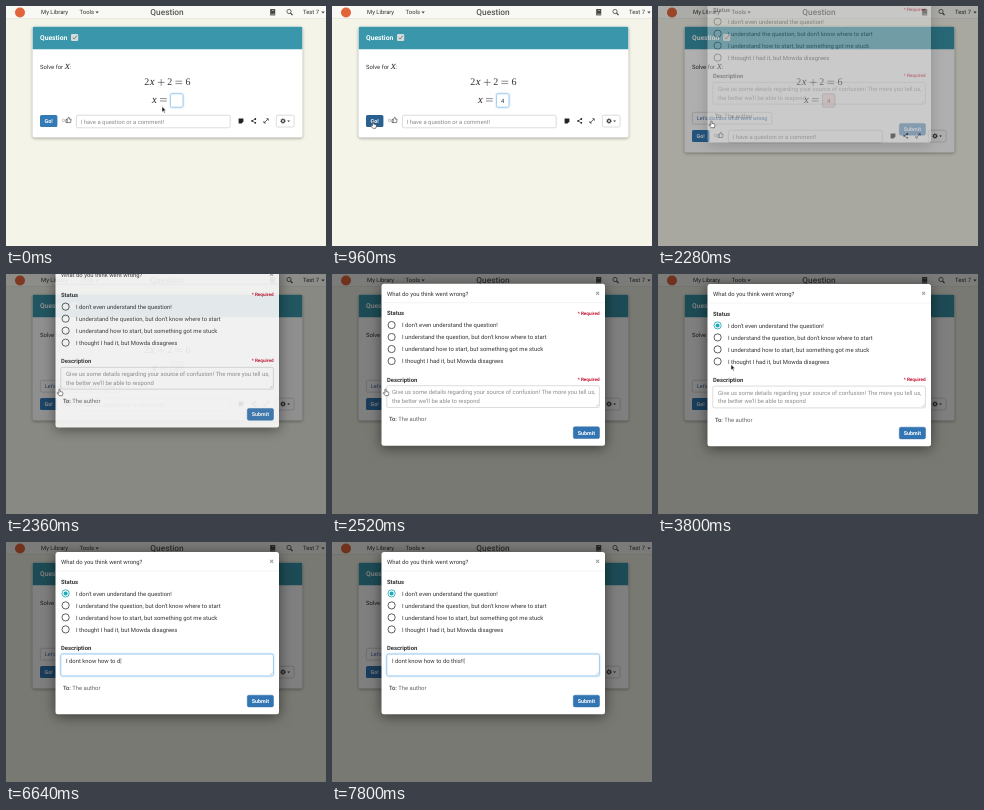
An HTML page that plays this animation: 320x240 px, repeating every 8000 ms.

```html
<!DOCTYPE html>
<html lang="en">
<head>
<meta charset="utf-8">
<title>Question</title>
<style>
  html, body { margin: 0; width: 100%; height: 100%; overflow: hidden; background: #f4f4e8; }
  svg { display: block; width: 100%; height: 100%; }
  text { font: 5.88px Roboto, sans-serif; fill: #333; text-rendering: geometricPrecision; white-space: pre; }
  .bold { font-weight: 700; }
  .mid { text-anchor: middle; }
  .white { fill: #fff; }
  .hint { fill: #8c8c8c; }
  .math { font: 10px "Liberation Serif", serif; }
  .var { font: italic 9.6px "Noto Serif", serif; }
  .required { font-size: 4.65px; font-weight: 700; fill: #c4122f; text-anchor: end; }
  .box { fill: #fff; stroke: #c4c4c4; stroke-width: .6; }
  .line { fill: none; stroke: #333; stroke-width: .7; }
  .radio { fill: #fff; stroke: #444; stroke-width: .85; }
  .focus { fill: #fff; stroke: #78b6e8; stroke-width: .65; filter: drop-shadow(0 0 1.2px #66afe980); }
  #card { filter: drop-shadow(0 1px 1.6px #0005); }
  #sheet { filter: drop-shadow(0 2.1px 6.3px #0008); }
  #mouse path { stroke-linejoin: round; }
</style>
</head>
<body>
<svg viewBox="0 0 320 240">
  <defs>
    <clipPath id="cardTop"><rect x="26.5" y="20.5" width="270" height="22.8"/></clipPath>
  </defs>
  <rect width="320" height="240" fill="#f4f4e8"/>

  <!-- navigation -->
  <rect width="320" height="12.6" fill="#f8f8f4"/>
  <rect y="12.4" width="320" height=".6" fill="#e2e2d8"/>
  <circle cx="14" cy="6.5" r="5" fill="#e2643a"/>
  <text x="35" y="8.3">My Library</text>
  <text x="73.6" y="8.3">Tools</text>
  <path d="M89.4 5.5h3.4l-1.7 1.9z" fill="#444"/>
  <text class="mid" x="161" y="9" style="font-size:8.3px;font-weight:500;fill:#555">Question</text>
  <path d="M264.2 3h5v6.4h-5z" fill="#444"/>
  <path d="M265 8.2h4M265.8 4.4h2.4" stroke="#ddd" stroke-width=".6"/>
  <path class="line" d="M284.6 7.1l1.9 2.1" style="stroke-width:1.1"/>
  <circle class="line" cx="283" cy="5.5" r="2.1"/>
  <text x="297" y="8.3">Test 7</text>
  <path d="M315.3 5.5h3.4l-1.7 1.9z" fill="#444"/>

  <!-- question card -->
  <rect id="card" x="26.5" y="20.5" width="270" height="111" rx="2" fill="#fff"/>
  <rect x="26.5" y="20.5" width="270" height="30" rx="2" fill="#3a97ab" clip-path="url(#cardTop)"/>
  <text class="bold white" x="34" y="34.4" style="font-size:6.75px">Question</text>
  <rect x="65" y="28" width="7.2" height="7" rx="1.2" fill="#d5dcdc"/>
  <path class="line" d="M66.8 31.6l1.4 1.5 2.5-3.4" style="stroke:#555"/>
  <text x="34" y="62.8">Solve for</text>
  <text class="var" x="58.8" y="62.8">x</text>
  <text x="64" y="62.8">:</text>
  <text class="math" x="138.2" y="79.4">2</text>
  <text class="var" x="143.4" y="79.4">x</text>
  <text class="math" x="161.2" y="79.4">2</text>
  <text class="math" x="179.4" y="79.4">6</text>
  <path class="line" d="M151.8 76.4h6.8M155.2 73v6.8M169.4 75.2h6.8M169.4 77.6h6.8" style="stroke-width:.55"/>
  <text class="var" x="145.8" y="96.7">x</text>
  <path class="line" d="M154 92.6h6.8M154 95h6.8" style="stroke-width:.55"/>
  <rect id="answer" class="focus" x="164.4" y="87.8" width="12.6" height="13.4" rx="1.5"/>
  <text id="digit" class="mid" x="170.7" y="96.6">4</text>

  <g id="discuss">
    <rect class="box" x="34.3" y="106.3" width="79.6" height="11.8" rx="1.5"/>
    <text x="39" y="114" style="font-size:5.18px;fill:#2f62a3">Let's discuss what went wrong</text>
  </g>

  <g id="actions">
    <g id="go">
      <rect id="goFace" x="34" y="109" width="17.4" height="12" rx="1.6"/>
      <text class="bold white mid" x="42.7" y="117" style="font-size:5.4px">Go!</text>
    </g>
    <text x="56.2" y="116.4" style="font-size:4.4px;fill:#777">0</text>
    <path class="line" d="M60 113.4v3.2h1.2v-3.2zM61.2 113.6l1.4-2.4q1.2 0 .6 1.9h1.9l-.5 3.5h-3.4" style="stroke-width:.6"/>
    <rect class="box" x="70.4" y="109.2" width="153.8" height="12.6" rx="1.6"/>
    <text class="hint" x="74.6" y="117.5">I have a question or a comment!</text>
    <path d="M232.6 112.6h4.8v3l-1.8 1.9h-3z" fill="#222"/>
    <path class="line" d="M249.2 113l-3 1.9 3 1.9"/>
    <path d="M248.4 113a.9.9 0 1 0 1.8 0 .9.9 0 1 0-1.8 0M245.2 114.9a.9.9 0 1 0 1.8 0 .9.9 0 1 0-1.8 0M248.4 116.8a.9.9 0 1 0 1.8 0 .9.9 0 1 0-1.8 0" fill="#222"/>
    <path class="line" d="M258.2 116.8l3.8-3.8M260.3 112.7h2v2M257.9 115v2h2"/>
    <rect class="box" x="270.3" y="109.2" width="17.8" height="11.8" rx="1.6"/>
    <circle class="line" cx="277" cy="115" r="1.5" style="stroke-width:1.2"/>
    <circle class="line" cx="277" cy="115" r="2.4" stroke-dasharray=".9 .985"/>
    <path d="M281.2 114.4h2.8l-1.4 1.6z" fill="#333"/>
  </g>

  <rect id="backdrop" width="320" height="240"/>

  <!-- dialog -->
  <g id="dialog">
    <rect id="sheet" x="49.5" y="10" width="223.5" height="162.2" rx="2.5" fill="#fff"/>
    <text x="55" y="22">What do you think went wrong?</text>
    <text class="bold mid" x="265.5" y="22" style="font-size:8px;fill:#999">×</text>
    <path d="M49.5 29h223.5" stroke="#e8e8e8" stroke-width=".5"/>
    <text class="bold" x="55" y="41.7">Status</text>
    <text id="needStatus" class="required" x="267.6" y="41">* Required</text>
    <g id="options"></g>
    <circle id="dot" cx="59.6" cy="51.4" fill="#20a9b9"/>
    <text class="bold" x="55" y="108.2">Description</text>
    <text id="needText" class="required" x="267.6" y="107">* Required</text>
    <rect id="area" x="54.8" y="112.1" width="212.6" height="21.8" rx="1.6"/>
    <path d="M264 132.8l2.4-2.4M265.4 132.8l1-1" stroke="#999" stroke-width=".4"/>
    <g id="placeholder">
      <text class="hint" x="60" y="120.8">Give us some details regarding your source of confusion! The more you tell us,</text>
      <text class="hint" x="60" y="129.3">the better we'll be able to respond</text>
    </g>
    <text id="typed" x="60" y="121"></text>
    <path id="caret" d="M60.6 116v5.8" stroke="#666" stroke-width=".5"/>
    <text x="57" y="147.5" style="fill:#666"><tspan style="font-weight:500;fill:#444">To:</tspan> The author</text>
    <rect x="241.3" y="153.2" width="26.2" height="11.7" rx="1.6" fill="#3375b2" stroke="#2e6da4" stroke-width=".5"/>
    <text class="bold white mid" x="254.4" y="161" style="font-size:5.4px">Submit</text>
  </g>

  <g id="mouse">
    <path id="arrow" d="M0 0v5.6l1.3-1.2 1 2.2.9-.4-1-2.1h1.8z" fill="#111" stroke="#fff" stroke-width=".5"/>
    <path id="hand" d="M-.6 0q.6-.6 1.2 0v2.1l2.3.6q.7.3.5 1.3l-.6 2.3h-3l-2.2-2.5q0-.8.8-.6l1 .7z" fill="#fff" stroke="#333" stroke-width=".6"/>
    <path id="beam" d="M-1.2-3.4q1.2 0 1.2.7V2.7q0 .7-1.2.7M1.2-3.4Q0-3.4 0-2.7V2.7q0 .7 1.2.7" fill="none" stroke="#333" stroke-width=".6"/>
  </g>
</svg>
<script>
const LOOP = 8000;
const $ = id => document.getElementById(id);
const clamp = v => Math.min(1, Math.max(0, v));
const span = (t, from, to) => clamp((t - from) / (to - from));
const smooth = p => p * p * (3 - 2 * p);
const easeOut = p => 1 - (1 - p) ** 1.75;
const set = (id, attrs) => {
  for (const name in attrs) $(id).setAttribute(name, attrs[name]);
};
const show = (id, on) => set(id, { visibility: on ? 'visible' : 'hidden' });

const options = [
  "I don't even understand the question!",
  "I understand the question, but don't know where to start",
  'I understand how to start, but something got me stuck',
  'I thought I had it, but Mowda disagrees'
];
$('options').innerHTML = options.map((label, i) => `
  <circle id="radio${i}" class="radio" cx="59.6" cy="${51.4 + 12 * i}" r="3.6"/>
  <text x="70" y="${53.5 + 12 * i}">${label}</text>`).join('');

// each burst types its text evenly between two times
const bursts = [
  ['I ', 4880, 5000],
  ['dont kn', 5160, 5580],
  ['ow ', 5680, 5960],
  ['how to do ', 6000, 6760],
  ['this', 6840, 7040],
  ['!!', 7280, 7400]
];
const typedAt = t => bursts.map(([text, from, to]) =>
  t < from ? '' : text.slice(0, 1 + Math.floor(span(t, from, to) * (text.length - 1) + 1e-6))
).join('');

// pointer stops: arrival time, x, y
const stops = [
  [40, 156, 100.5], [280, 80, 107], [480, 80, 107], [960, 41, 116],
  [1480, 41, 116], [1700, 43, 116.2], [1800, 43, 116.2], [2000, 53.5, 115.4],
  [2640, 53.5, 115.4], [3080, 60, 51], [3360, 60, 51], [3760, 73, 90.5],
  [3800, 73, 90.5], [3960, 84, 122], [4240, 84, 122], [4480, 92, 126]
];
function pointerAt(t) {
  const i = stops.findIndex(s => s[0] > t);
  if (i === 0) return stops[0].slice(1);
  if (i < 0) return stops[stops.length - 1].slice(1);
  const [from, x0, y0] = stops[i - 1], [to, x1, y1] = stops[i];
  const p = smooth(span(t, from, to));
  return [x0 + (x1 - x0) * p, y0 + (y1 - y0) * p];
}
function pointerKind(t) {
  if (t >= 4900) return '';
  if (t >= 3880) return 'beam';
  return (t > 860 && t < 2680) || (t > 3040 && t < 3420) ? 'hand' : 'arrow';
}

function drawPage(t) {
  const wrong = t >= 1120;
  show('digit', t >= 120);
  set('digit', { style: wrong ? 'fill:#b04a4a' : '' });
  set('answer', {
    class: t < 1040 ? 'focus' : 'box',
    style: wrong ? 'fill:#f4dfdf;stroke:#b9a5a5' : ''
  });
  const open = smooth(span(t, 1480, 1720));
  set('card', { height: 111 + 15 * open });
  set('discuss', { opacity: open });
  set('actions', { transform: `translate(0 ${15 * open})` });
  const pressed = t >= 1040 && t < 2040;
  set('go', { transform: `translate(${pressed ? -3 * open : 0} 0)` });
  set('goFace', { fill: pressed ? '#204d74' : t >= 900 && t < 1040 ? '#286090' : '#337ab7' });
}

function drawDialog(t) {
  set('backdrop', { opacity: .5 * span(t, 2080, 2400) });
  const drop = easeOut(span(t, 2260, 2540));
  set('dialog', {
    opacity: span(t, 2230, 2380),
    transform: `translate(0 ${-41 * (1 - drop)})`
  });
  const chosen = t >= 3160;
  show('needStatus', !chosen);
  show('needText', t < 5840);
  set('radio0', { style: chosen ? 'stroke:#20a9b9' : '' });
  set('dot', { r: 2 * smooth(span(t, 3160, 3360)) });
  set('area', { class: t >= 4280 ? 'focus' : 'box' });
  show('placeholder', t < 4880);
  $('typed').textContent = typedAt(t);
  show('caret', t >= 4880);
  set('caret', { transform: `translate(${$('typed').getComputedTextLength()} 0)` });
}

function drawPointer(t) {
  const kind = pointerKind(t);
  for (const id of ['arrow', 'hand', 'beam']) show(id, id === kind);
  set('mouse', { transform: `translate(${pointerAt(t)})` });
}

const start = performance.now();
function frame() {
  const t = (performance.now() - start) % LOOP;
  drawPage(t);
  drawDialog(t);
  drawPointer(t);
  requestAnimationFrame(frame);
}
frame();
</script>
</body>
</html>
```
